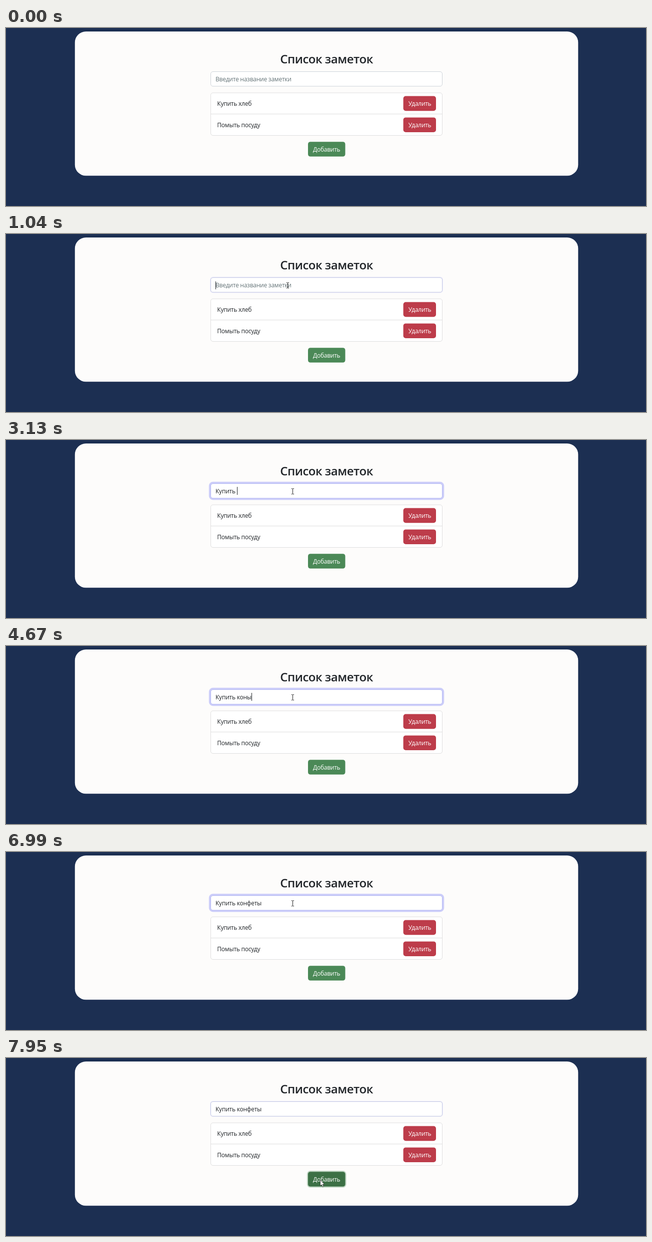
An HTML page that plays this animation: 1280 by 357 pixels, repeating every 8 s.

```html
<!DOCTYPE html>
<html lang="ru">
<head>
<meta charset="utf-8">
<title>Список заметок</title>
<style>
  html, body { margin: 0; width: 100%; height: 100%; overflow: hidden; background: #1c2f52; }
  svg { display: block; width: 100%; height: 100%; }
  text { font: 400 12px "Open Sans", "Noto Sans", sans-serif; letter-spacing: -.23px; fill: #212529; white-space: pre; }
  .title { font-size: 24px; font-weight: 600; letter-spacing: -.5px; }
  .mid { text-anchor: middle; }
  .btn { fill: #fff; font-weight: 500; letter-spacing: -.28px; }
  .hint { fill: #667579; }
  .red { fill: #bd3c4a; }
  .box { fill: #fff; stroke: #dfdfdf; }
</style>
</head>
<body>
<svg viewBox="0 0 1280 357">
  <rect width="1280" height="357" fill="#1c2f52"/>
  <rect x="137.8" y="7" width="1006.5" height="289.3" rx="22" fill="#fdfcfb"/>
  <text class="title mid" x="641" y="70.5">Список заметок</text>

  <rect id="ring" fill="#cccdf9"/>
  <rect id="field" x="409.5" y="87.5" width="463" height="29.3" rx="4.5" fill="#fff"/>
  <text id="hint" class="hint" x="419" y="107">Введите название заметки</text>
  <text id="typed" x="419" y="107"></text>
  <rect id="caret" width="1" height="16" fill="#212529"/>

  <rect class="box" x="409.5" y="130" width="463" height="85.5" rx="4.5"/>
  <path d="M410 172.5H872.5" stroke="#dfdfdf"/>
  <text x="422.3" y="156">Купить хлеб</text>
  <text x="422.3" y="199">Помыть посуду</text>
  <rect class="red" x="794.6" y="136.6" width="65.4" height="29.6" rx="4.8"/>
  <rect class="red" x="794.6" y="179.4" width="65.4" height="29.6" rx="4.8"/>
  <text class="btn mid" x="827.5" y="156">Удалить</text>
  <text class="btn mid" x="827.5" y="199">Удалить</text>

  <rect id="addRing" fill="#a6c5ac"/>
  <rect id="add" x="604" y="228.2" width="74.5" height="29.6" rx="4.8"/>
  <text class="btn mid" x="641.2" y="248">Добавить</text>

  <path id="beam" d="M-2.5-5.5h2M.5-5.5h2M-2.5 5.5h2M.5 5.5h2M0-5V5" fill="none" stroke="#222"/>
  <path id="arrow" d="M0 0V12L2.8 9.5 4.7 14 6.7 13.1 4.8 8.8H8.5Z" fill="#fff" stroke="#222" stroke-width=".8"/>
</svg>
<script>
const LOOP = 8000, TICK = 66.9, BLINK = 530, FADE = 150;
const FOCUS = 980, TYPE = 2240, HOVER = 7700, BLUR = 7860;

// One sign per tick: a dot rests, "<" deletes, anything else is typed.
const KEYS = 'Ку....пи..т.ь ..ко..н....<.<.....о.ны..е...т...<.<.<...ф..ет..ы ';

// Pointer legs: start time, ticks taken, end point.
const ENTER = { start: 100, x: 1122, y: 290 };
const LEGS = [
  { start: 100, ticks: 3, x: 550.5, y: 89 },
  { start: 435, ticks: 3, x: 563.5, y: 103 },
  { start: 1035, ticks: 2, x: 573.5, y: 103 },
  { start: 7193, ticks: 9, x: 628.5, y: 244.5 }
];

const $ = id => document.getElementById(id);
const clamp = v => Math.min(1, Math.max(0, v));
const smooth = u => u * u * (3 - 2 * u);
const fade = (t, start) => smooth(clamp((t - start) / FADE));
const mix = (a, b, p) => `rgb(${a.map((v, i) => Math.round(v + (b[i] - v) * p))})`;

function set(el, attrs) {
  for (const name in attrs) el.setAttribute(name, attrs[name]);
}

function show(el, on) {
  set(el, { visibility: on ? 'visible' : 'hidden' });
}

function typing(t) {
  let text = '', last = FOCUS;
  [...KEYS].forEach((key, i) => {
    const time = TYPE + i * TICK;
    if (key === '.' || time > t) return;
    text = key === '<' ? text.slice(0, -1) : text + key;
    last = time;
  });
  return { text: text.replaceAll(' ', '\u00a0'), last };
}

function pointerAt(t) {
  let { x, y } = ENTER;
  for (const leg of LEGS) {
    const p = smooth(clamp(Math.floor((t - leg.start) / TICK) / leg.ticks));
    x += (leg.x - x) * p;
    y += (leg.y - y) * p;
  }
  return { x, y };
}

function drawInput(t) {
  const { text, last } = typing(t);
  const typed = $('typed');
  if (typed.textContent !== text) typed.textContent = text;
  show($('hint'), !text);

  const width = text ? typed.getComputedTextLength() : 0;
  const lit = Math.floor((t - last) / BLINK) % 2 === 0;
  set($('caret'), { x: Math.round(419 + width), y: text ? 94 : 95 });
  show($('caret'), t >= FOCUS && t < BLUR && lit);
}

function spread(el, x, y, w, h, p) {
  const s = 3.2 * p;
  set(el, { x: x - s, y: y - s, width: w + 2 * s, height: h + 2 * s, rx: 4.8 + s, opacity: p });
}

function drawFocus(t) {
  const left = fade(t, BLUR), p = fade(t, FOCUS) - left;
  spread($('ring'), 409, 87, 464, 30, p);
  set($('field'), { stroke: mix([206, 212, 218], [180, 185, 243], p) });
  spread($('addRing'), 604, 228.2, 74.5, 29.6, left);
  set($('add'), { fill: mix([75, 137, 87], [60, 112, 69], fade(t, HOVER)) });
}

function drawPointer(t) {
  const { x, y } = pointerAt(t);
  const inField = y > 87 && y < 118;
  const here = t >= ENTER.start;
  for (const id of ['beam', 'arrow']) {
    set($(id), { transform: `translate(${x} ${y})` });
    show($(id), here && inField === (id === 'beam'));
  }
}

function frame() {
  const t = performance.now() % LOOP;
  drawInput(t);
  drawFocus(t);
  drawPointer(t);
  requestAnimationFrame(frame);
}
frame();
</script>
</body>
</html>
```
